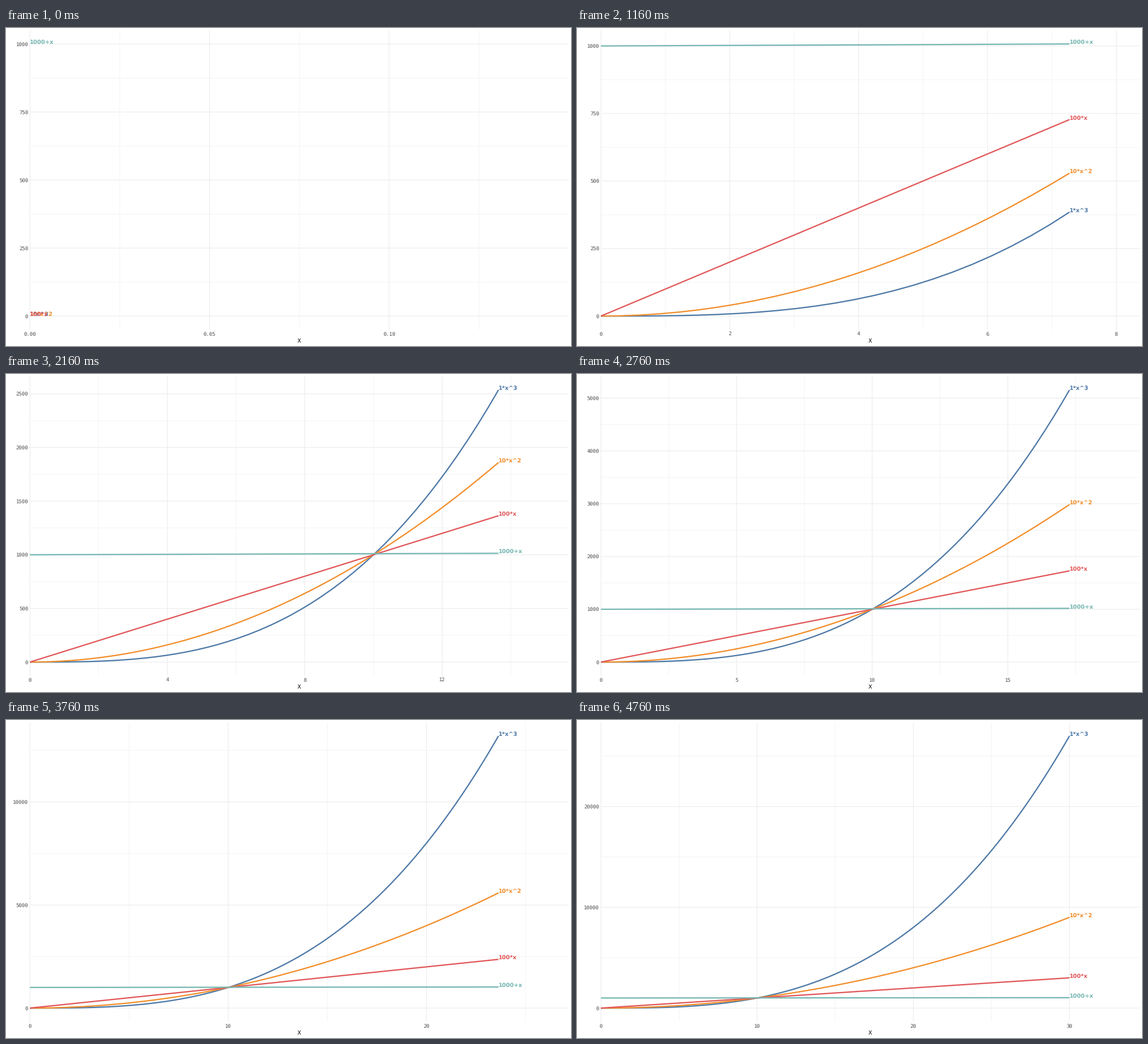
Write a matplotlib script that moves like this. It is 998 px wide and 561 px high and loops after 4.8 s.

```python
import math

import matplotlib.pyplot as plt
import numpy as np
from matplotlib.animation import FuncAnimation
from matplotlib.collections import LineCollection

W, H, DPI = 998, 561, 64
PX = 72 / DPI  # points per pixel
FRAMES, INTERVAL = 120, 40
LEFT, RIGHT, TOP, BOTTOM = 42.3, 994.0, 4.2, 532.2

CURVES = [
    ("1*x^3", "#4E79A7", lambda x: x ** 3),
    ("10*x^2", "#F28E2B", lambda x: 10 * x ** 2),
    ("100*x", "#E15759", lambda x: 100 * x),
    ("1000+x", "#76B7B2", lambda x: 1000 + x),
]
XS = np.linspace(0, 30, 100)
YS = [fn(XS) for _, _, fn in CURVES]
KNOTS = np.round(np.linspace(0, FRAMES - 1, len(XS)))  # frame that reaches each sample

plt.rcParams["text.hinting"] = "none"
plt.rcParams["text.hinting_factor"] = 1
plt.rcParams["path.simplify"] = False

fig = plt.figure(figsize=(W / DPI, H / DPI), dpi=DPI, facecolor="white")
ax = fig.add_axes([0, 0, 1, 1])
ax.set_xlim(0, W)
ax.set_ylim(H, 0)
ax.axis("off")


def tick_step(lo, hi, want=5):
    """Step of the best scoring labels (extended Wilkinson search)."""
    nice = [1, 5, 2, 2.5, 4, 3]
    span = hi - lo
    best, best_step = -math.inf, span
    for i, q in enumerate(nice):
        for k in range(2, 13):
            z0 = math.ceil(math.log10(span / (k + 1) / q))
            for z in (z0, z0 + 1):
                step = q * 10.0 ** z
                first = math.floor(hi / step) - (k - 1)
                last = math.ceil(lo / step)
                for start in range(first, last + 1):
                    a, b = start * step, (start + k - 1) * step
                    simple = -i / (len(nice) - 1) + (a <= 0 <= b)
                    cover = 1 - 0.5 * ((hi - b) ** 2 + (lo - a) ** 2) / (0.1 * span) ** 2
                    r = (k - 1) / (b - a)
                    rt = (want - 1) / (max(b, hi) - min(a, lo))
                    dense = 2 - max(r / rt, rt / r)
                    score = 0.25 * simple + 0.2 * cover + 0.5 * dense + 0.05
                    if score > best + 1e-12:
                        best, best_step = score, step
    return best_step


def ticks(lo, hi):
    """Major values with their labels, and the minor values between them."""
    step = tick_step(lo, hi)
    text = f"{step:.6g}"
    digits = len(text.split(".")[1]) if "." in text else 0
    major = [n * step for n in range(int(hi / step) + 2) if n * step <= hi]
    minor = [(n + 0.5) * step for n in range(len(major) + 1) if (n + 0.5) * step <= hi]
    return major, [f"{v:.{digits}f}" for v in major], minor


def grid_lines(width, z):
    lines = LineCollection([], colors="#EBEBEB", linewidths=width * PX, zorder=z, snap=False)
    ax.add_collection(lines, autolim=False)
    return lines


def mono(x, y, text, color, size, ha):
    return ax.text(x, y, text, color=color, fontsize=size * PX, ha=ha,
                   va="baseline", family="DejaVu Sans Mono")


minor_grid = grid_lines(0.53, 1)
major_grid = grid_lines(1.07, 2)
strokes = [ax.plot([], [], color=color, lw=2.3 * PX, zorder=3 + i / 10,
                   solid_capstyle="butt", solid_joinstyle="round")[0]
           for i, (_, color, _) in enumerate(CURVES)]
names = [ax.text(0, 0, name, color=color, fontsize=9.96 * PX, weight="bold",
                 family="DejaVu Sans", va="baseline", zorder=4 + i / 10)
         for i, (name, color, _) in enumerate(CURVES)]
mono((LEFT + RIGHT) / 2, 555.3, "X", "black", 10, "center")
tick_texts = []


def draw(frame):
    head_x = np.interp(frame, KNOTS, XS)
    heads = [np.interp(frame, KNOTS, ys) for ys in YS]
    shown = KNOTS <= frame

    x_hi = head_x * 1.15 if head_x > 0 else 0.15
    top = max(heads[0], heads[3])
    y_lo, y_hi = -0.05 * top, 1.05 * top

    def sx(x):
        return LEFT + x / x_hi * (RIGHT - LEFT)

    def sy(y):
        return BOTTOM - (y - y_lo) / (y_hi - y_lo) * (BOTTOM - TOP)

    def segments(xs, ys):
        return ([[(sx(x), TOP), (sx(x), BOTTOM)] for x in xs]
                + [[(LEFT, sy(y)), (RIGHT, sy(y))] for y in ys])

    x_major, x_text, x_minor = ticks(0, x_hi)
    y_major, y_text, y_minor = ticks(y_lo, y_hi)
    major_grid.set_segments(segments(x_major, y_major))
    minor_grid.set_segments(segments(x_minor, y_minor))

    while tick_texts:
        tick_texts.pop().remove()
    for x, text in zip(x_major, x_text):
        tick_texts.append(mono(sx(x), 542.4, text, "#4D4D4D", 8.8, "center"))
    for y, text in zip(y_major, y_text):
        tick_texts.append(mono(39.3, sy(y) + 3.2, text, "#4D4D4D", 8.8, "right"))

    for stroke, name, ys, head_y in zip(strokes, names, YS, heads):
        stroke.set_data(sx(np.append(XS[shown], head_x)), sy(np.append(ys[shown], head_y)))
        name.set_position((sx(head_x), sy(head_y)))
    return []


anim = FuncAnimation(fig, draw, frames=FRAMES, init_func=lambda: [],
                     interval=INTERVAL, repeat=True, repeat_delay=0, blit=False)
plt.show()
```
